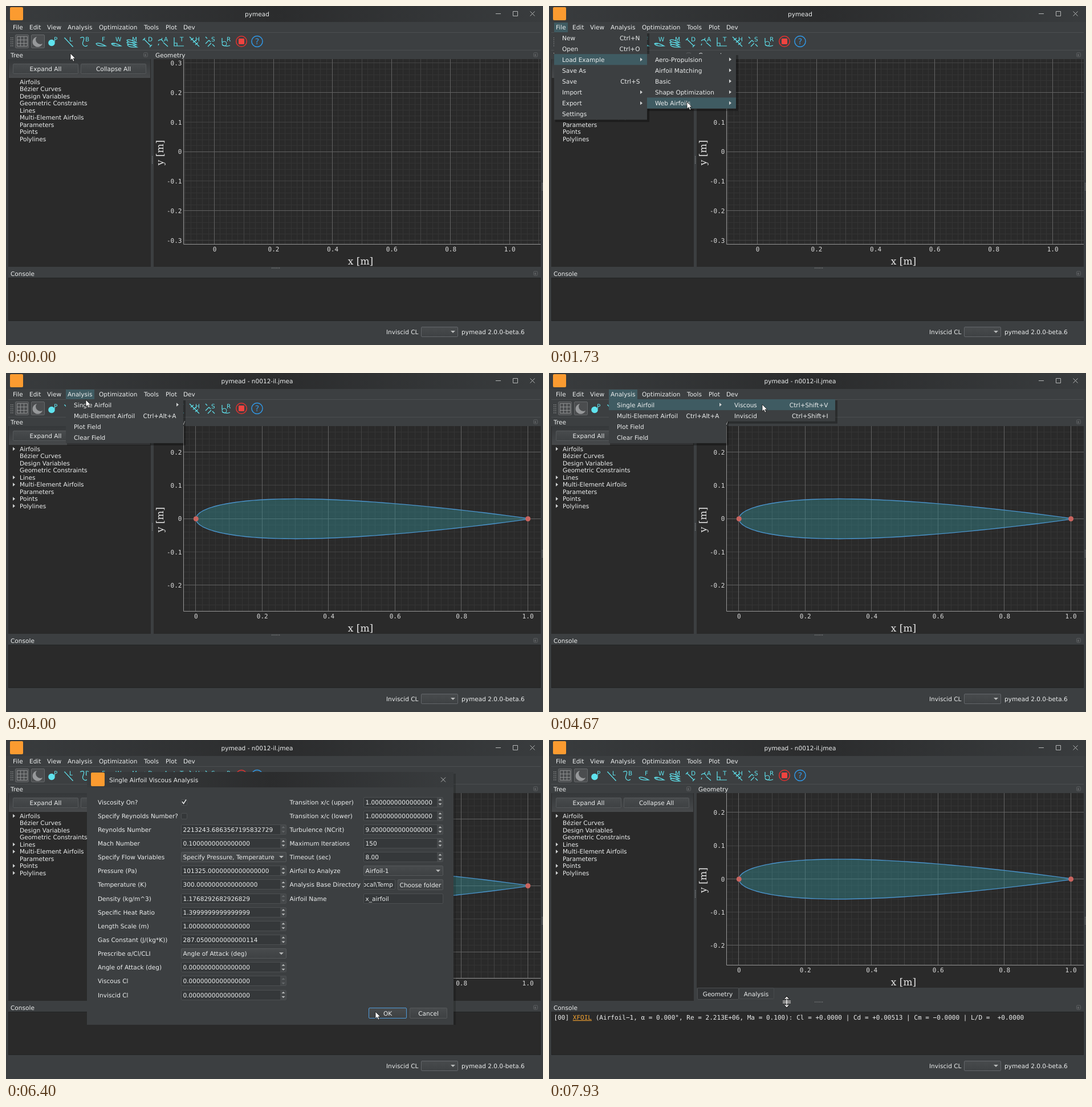
These frames come from a looping animation (942 px wide and 594 px high, 8 s). An HTML page:

```html
<!DOCTYPE html>
<html lang="en">
<head>
<meta charset="utf-8">
<title>pymead</title>
<style>
  html, body { margin: 0; width: 100%; height: 100%; overflow: hidden; background: #3c3f41; }
  svg { display: block; width: 942px; height: 594px; }
  text { font: 10.55px "DejaVu Sans", sans-serif; fill: #eceeee; white-space: pre; text-rendering: geometricPrecision; }
  .mono { font: 11.05px "DejaVu Sans Mono", monospace; }
  .tick { font: 11.05px "DejaVu Sans Mono", monospace; fill: #dcdcdc; }
  .axis { font: 17px "DejaVu Serif", serif; fill: #e8e8e8; }
  .icon text { font-size: 10.5px; fill: #5fe3ee; }
  .icon path { fill: none; stroke: #5fe3ee; stroke-width: 1.2; }
</style>
</head>
<body>
<svg viewBox="0 0 942 594" xmlns="http://www.w3.org/2000/svg"></svg>
<script>
const BG = '#3c3f41', BASE = '#2a2a2a', EDGE = '#55585a', HOVER = '#3f5b62', CYAN = '#5fe3ee', LOGO = '#fb9b30';
const LOOP = 8000, STEP = 1000 / 15, ROW = 19.1;

const rect = (x, y, w, h, fill, extra = '') =>
  `<rect x="${x}" y="${y}" width="${w}" height="${h}" fill="${fill}" ${extra}/>`;
const box = (x, y, w, h, fill, stroke = EDGE) =>
  rect(x + .5, y + .5, w - 1, h - 1, fill, `stroke="${stroke}" rx="1.5"`);
const text = (x, y, s, extra = '') => `<text x="${x}" y="${y}" ${extra}>${s}</text>`;
const mid = (x, y, s, extra = '') => text(x, y, s, 'text-anchor="middle" ' + extra);
const end = (x, y, s, extra = '') => text(x, y, s, 'text-anchor="end" ' + extra);
const path = (d, stroke, w = 1, fill = 'none') =>
  `<path d="${d}" stroke="${stroke}" stroke-width="${w}" fill="${fill}"/>`;
const circle = (x, y, r, fill, extra = '') => `<circle cx="${x}" cy="${y}" r="${r}" fill="${fill}" ${extra}/>`;
const group = (id, body, extra = '') => `<g id="${id}" ${extra}>${body}</g>`;
const range = (n, f) => Array.from({ length: n }, (_, i) => f(i)).join('');
const down = (x, y, c = '#b8baba') => path(`M${x - 4} ${y - 2}h8l-4 4z`, 'none', 0, c);
const right = (x, y) => path(`M${x} ${y - 3.2}v6.4l4 -3.2z`, 'none', 0, '#d0d2d2');
const cross = (x, y) => path(`M${x - 4} ${y - 4}l8 8m0 -8l-8 8`, '#b4b6b6');
const button = (x, y, w, h, s, stroke) =>
  box(x, y, w, h, 'url(#raised)', stroke) + mid(x + w / 2, y + h / 2 + 4, s);

function defs() {
  return `<defs>
    <linearGradient id="bar"><stop stop-color="#393c3e"/><stop offset=".5" stop-color="#2b2c2d"/><stop offset="1" stop-color="#393c3e"/></linearGradient>
    <linearGradient id="raised" x2="0" y2="1"><stop stop-color="#484b4d"/><stop offset="1" stop-color="#3e4143"/></linearGradient>
    <linearGradient id="strip" x2="0" y2="1"><stop stop-color="#35383a"/><stop offset="1" stop-color="#47494b"/></linearGradient>
    <clipPath id="dir"><rect x="628" y="245" width="54" height="18"/></clipPath>
  </defs>`;
}

function toolbar() {
  const foil = (x, y) => `M${x} ${y}q4 -3 17 4q-15 1 -17 -4z`;
  const letters = [['P', 84], ['L', 111], ['B', 139], ['F', 168], ['W', 192], ['M', 221], ['D', 249],
    ['A', 277], ['T', 305], ['H', 332], ['S', 360], ['R', 387]];
  const shapes = [
    'M103 56l14 15M102 56h2M116 71h2', 'M130 56c9 -4 7 2 5 7s3 10 8 6',
    foil(158, 66), foil(185, 66) + 'M185 66l6 1', foil(212, 60) + foil(212, 64) + foil(213, 68),
    'M242 58l12 12M240 60l4 -4M252 72l4 -4', 'M267 61q6 -5 9 2M276 64l8 7M268 66l-1 3M272 60l2 -4',
    'M295 55v15h17M295 65h5v5', 'M322 54l17 17M324 60l5 -4M328 64l5 -4M332 68l5 -4',
    'M350 54l3 3M356 60l3 3M362 67l4 4M350 66l6 -6M354 71l6 -6', 'M379 56v8M379 68q8 4 14 1'];
  return range(5, i => rect(8, 55 + i * 3.5, 1.5, 1.5, '#8a8c8d') + rect(11, 55 + i * 3.5, 1.5, 1.5, '#8a8c8d'))
    + box(16, 50, 24, 24, '#4b4d4f', '#65686a') + box(44, 50, 24, 24, '#4b4d4f', '#65686a')
    + path('M19.5 53.5h18v17h-18zM19.5 59.5h18M19.5 65.5h18M25.5 53.5v17M31.5 53.5v17', '#8c8e8f')
    + path('M54 54a9 9 0 1 0 10 12a8 8 0 0 1 -10 -12z', 'none', 0, '#96989a')
    + `<g class="icon">${shapes.map(d => `<path d="${d}"/>`).join('')}
       ${letters.map(([s, x]) => text(x, 61.5, s)).join('')}
       <circle cx="383" cy="66" r="4" fill="none" stroke="${CYAN}"/></g>`
    + circle(80, 64.5, 5.8, CYAN)
    + circle(413, 62, 9.3, 'none', 'stroke="#e23230" stroke-width="1.5"') + rect(408, 57, 10, 10, '#f04440', 'rx="1"')
    + circle(440.5, 62, 9.6, 'none', 'stroke="#3198e6" stroke-width="1.5"')
    + mid(440.5, 67, '?', 'style="font-size:14px;fill:#3198e6"');
}

function shell() {
  const bar = [['File', 12], ['Edit', 41], ['View', 72], ['Analysis', 108], ['Optimization', 163],
    ['Tools', 242], ['Plot', 280], ['Dev', 311]];
  const dock = (x, y, s, r) => text(x, y + 4, s) + box(r, y - 4, 8, 8, 'none', '#5c5f61') + rect(r + 2, y - 1, 3, 3, '#5c5f61');
  const dots = (x, y, dx, dy) => range(6, i => rect(x + i * dx, y + i * dy, 1.2, 1.2, '#8c8e8f'));
  return rect(0, 0, 942, 594, BG) + rect(0, 0, 942, 28, 'url(#bar)')
    + rect(7, 2, 23, 23, LOGO, 'rx="2"')
    + mid(440.5, 17.5, '', 'id="title"')
    + path('M859 13.5h9M889.5 9.5h8v8h-8z', '#b4b6b6') + cross(923.5, 13.5)
    + group('fileHot', rect(9, 29, 24, 17, HOVER)) + group('anaHot', rect(105, 29, 50, 17, HOVER))
    + bar.map(([s, x]) => text(x, 41, s)).join('')
    + rect(4, 46, 934, 1, '#4b4e50') + rect(4, 77, 934, 1, '#4b4e50') + toolbar()
    + dock(8, 85.5, 'Tree', 241) + dock(262, 85.5, 'Geometry', 925) + dock(8, 468.5, 'Console', 925)
    + rect(4, 93, 250, 364, BASE) + rect(5, 93, 248, 33, 'url(#strip)')
    + button(12, 101, 115, 18, 'Expand All') + button(131, 101, 115, 18, 'Collapse All')
    + ['Airfoils', 'Bézier Curves', 'Design Variables', 'Geometric Constraints', 'Lines',
      'Multi-Element Airfoils', 'Parameters', 'Points', 'Polylines']
      .map((s, i) => text(24, 136.8 + i * 12.5, s)).join('')
    + group('arrows', [0, 4, 5, 7, 8].map(i => right(12, 133 + i * 12.5)).join(''))
    + dots(256, 263, 0, 2.4) + dots(940, 310, 0, 2.4) + dots(466, 458.5, 2.6, 0)
    + rect(4, 476, 934, 76, '#232425') + rect(5, 477, 932, 74, BASE)
    + text(667, 575, 'Inviscid CL') + box(728, 562, 65, 18, 'url(#raised)', '#63666a') + down(784, 571)
    + text(799, 575, 'pymead 2.0.0-beta.6');
}

// scale in px per unit, screen place of the origin, and bottom edge of the plot
function plot(s, x0, y0, bottom, foil) {
  const L = 312, T = 93, R = 938;
  const levels = [[.02, '#343434'], [.1, '#434343'], [.2, '#626262']];
  let out = rect(259, T, 679, bottom + 39 - T, BASE);
  for (const [gap, color] of levels) {
    const px = gap * s;
    let d = '';
    for (let i = Math.ceil((L - x0) / px); x0 + i * px < R; i++) d += `M${Math.round(x0 + i * px) - .5} ${T}V${bottom}`;
    for (let i = Math.ceil((T - y0) / px); y0 + i * px < bottom; i++) d += `M${L} ${Math.round(y0 + i * px) - .5}H${R}`;
    out += path(d, color);
  }
  out += path(`M311.5 ${T}V${bottom - .5}H${R}`, '#969696');
  out += range(6, i => mid(x0 + i * .2 * s, bottom + 11.5, i ? (i / 5).toFixed(1) : '0', 'class="tick"'));
  for (let i = -3; i <= 3; i++) {
    const y = y0 - i * .1 * s;
    if (y > T + 5 && y < bottom - 5) out += end(308.5, y + 3.8, i ? (i / 10).toFixed(1) : '0', 'class="tick"');
  }
  out += mid(622, bottom + 34.5, 'x [m]', 'class="axis"')
    + mid(0, 0, 'y [m]', `class="axis" transform="translate(276 ${(T + bottom) / 2 + 1.5}) rotate(-90)"`);
  if (foil) {
    const half = x => .6 * (.2969 * Math.sqrt(x) - .126 * x - .3516 * x ** 2 + .2843 * x ** 3 - .1015 * x ** 4);
    const side = (sign, i) => { const x = (i / 60) ** 2; return `${x0 + x * s} ${y0 - sign * half(x) * s} `; };
    out += path('M' + range(61, i => side(1, 60 - i)) + range(61, i => side(-1, i)) + 'z', '#4a94cc', 1.4, 'rgba(52,135,143,.45)')
      + [0, 1].map(x => circle(x0 + x * s, y0, 4.5, '#c9645f')).join('');
  }
  return out;
}

function results() {
  return plot(582.3, 333.3, 243.8, 395, true) + rect(259, 434, 679, 23, BG)
    + box(260, 434, 73, 21, '#303234', '#4c4f51') + box(333, 434, 62, 20, '#3a3d3f', '#484b4d')
    + mid(296, 449, 'Geometry') + mid(363.5, 448.5, 'Analysis');
}

function consoleLine() {
  return text(8.5, 490, '[00] <tspan fill="#f0a030" text-decoration="underline">XFOIL</tspan> (Airfoil−1, α = 0.000°, Re = 2.213E+06, Ma = 0.100): '
    + 'Cl = +0.0000 | Cd = +0.00513 | Cm = −0.0000 | L/D =  +0.0000', 'class="mono"');
}

function dialog() {
  const zero = '0.' + '0'.repeat(16), one = '1.' + '0'.repeat(16);
  const rowY = i => 108.5 + 24.15 * i;
  const field = (x, y, w, s) => box(x, Math.round(y) - 9, w, 18, '#35383a', '#4c4f51') + text(x + 3.5, y + 4, s);
  const spin = (x, y, w, s, off) => {
    const c = off ? '#66696b' : '#bcbebe', bx = x + w - 5.5;
    return field(x, y, w, s) + rect(x + w - 11, Math.round(y) - 8, 10, 16, '#45484a')
      + path(`M${bx - 3} ${y - 2.5}h6l-3 -3zM${bx - 3} ${y + 2.5}h6l-3 3z`, 'none', 0, c);
  };
  const combo = (x, y, w, s) => box(x, Math.round(y) - 9, w, 18, 'url(#raised)') + text(x + 3.5, y + 4, s) + down(x + w - 9, y);
  const check = y => box(307, Math.round(y) - 5, 11, 11, '#35383a', '#4c4f51');
  const left = [
    ['Viscosity On?'], ['Specify Reynolds Number?'],
    ['Reynolds Number', '2213243.6863567195832729', 'off'], ['Mach Number', '0.1' + '0'.repeat(15)],
    ['Specify Flow Variables', 'Specify Pressure, Temperature', 'list'],
    ['Pressure (Pa)', '101325' + zero.slice(1)], ['Temperature (K)', '300' + zero.slice(1)],
    ['Density (kg/m^3)', '1.1768292682926829', 'off'], ['Specific Heat Ratio', '1.3999999999999999'],
    ['Length Scale (m)', one], ['Gas Constant (J/(kg*K))', '287.0500000000000114'],
    ['Prescribe α/Cl/CLI', 'Angle of Attack (deg)', 'list'], ['Angle of Attack (deg)', zero],
    ['Viscous Cl', zero, 'off'], ['Inviscid Cl', zero]];
  const rightSide = [
    ['Transition x/c (upper)', one], ['Transition x/c (lower)', one], ['Turbulence (NCrit)', '9' + zero.slice(1)],
    ['Maximum Iterations', '150'], ['Timeout (sec)', '8.00'], ['Airfoil to Analyze', 'Airfoil-1', 'list'],
    ['Analysis Base Directory'], ['Airfoil Name']];
  const column = (rows, lx, fx, w) => rows.map(([label, value, kind], i) =>
    text(lx, rowY(i) + 4, label) + (!value ? '' : kind === 'list' ? combo(fx, rowY(i), w, value)
      : spin(fx, rowY(i), w, value, kind))).join('');
  return rect(144, 59, 645, 440, 'rgba(0,0,0,.18)') + rect(142, 56, 643, 443, BG) + rect(142, 56, 643, 27, 'url(#bar)')
    + rect(149, 57, 24, 24, LOGO, 'rx="2"') + text(181, 73.5, 'Single Airfoil Viscous Analysis') + cross(767, 69.5)
    + column(left, 161, 307, 185) + column(rightSide, 497.5, 627, 140)
    + check(rowY(0)) + path('M309 108l2.5 3.5l4.5 -7', '#eceeee', 1.5) + check(rowY(1))
    + box(627, 244, 56, 18, '#35383a', '#4c4f51') + end(679, rowY(6) + 4, 'Local\\Temp', 'clip-path="url(#dir)"')
    + button(687, 244, 80, 19, 'Choose folder') + field(627, rowY(7), 140, 'x_airfoil')
    + button(636, 469, 67, 19, 'OK', '#4f9ad8') + button(708, 469, 66, 19, 'Cancel');
}

// from, till: when shown; child: row kept lit once its submenu opens
const menus = [
  { id: 'file', x: 9, y: 46, w: 163, from: 530, till: 2730, child: [1270, 2], items: [['New', 'Ctrl+N'], ['Open', 'Ctrl+O'],
    ['Load Example', '>'], ['Save As'], ['Save', 'Ctrl+S'], ['Import', '>'], ['Export', '>'], ['Settings']] },
  { id: 'examples', x: 172, y: 84, w: 156, from: 1270, till: 2730, child: [1930, 4], items: [['Aero-Propulsion', '>'],
    ['Airfoil Matching', '>'], ['Basic', '>'], ['Shape Optimization', '>'], ['Web Airfoils', '>']] },
  { id: 'web', x: 328, y: 161, w: 120, from: 1930, till: 2730, items: [['n0012-il']] },
  { id: 'analysis', x: 105, y: 46, w: 206, from: 3800, till: 4870, child: [4270, 0], items: [['Single Airfoil', '>'],
    ['Multi-Element Airfoil', 'Ctrl+Alt+A'], ['Plot Field'], ['Clear Field']] },
  { id: 'single', x: 311, y: 46, w: 191, from: 4270, till: 4870, items: [['Viscous', 'Ctrl+Shift+V'], ['Inviscid', 'Ctrl+Shift+I']] }];

function menu({ id, x, y, w, items }) {
  const h = items.length * ROW + .5;
  return group(id, rect(x + 2, y + 2, w + 2, h + 2, 'rgba(0,0,0,.3)') + rect(x, y, w, h, BG)
    + rect(x, y, w, ROW, HOVER, `id="${id}Lit"`)
    + items.map(([label, key], i) => {
      const c = y + (i + .5) * ROW;
      return text(x + 14, c + 4, label) + (key === '>' ? right(x + w - 12, c) : key ? end(x + w - 12.5, c + 4, key) : '');
    }).join(''));
}

document.querySelector('svg').innerHTML = defs() + shell()
  + group('empty', plot(517.7, 366, 255.5, 418, false))
  + group('loaded', plot(582.3, 333.3, 255.5, 418, true))
  + group('auto', box(260, 446, 11, 10, '#1c1c1c', '#b0b0b0') + mid(265.5, 454.5, 'A', 'style="font-size:9.5px"'))
  + group('done', results()) + group('log', consoleLine())
  + menus.map(menu).join('') + group('dialog', dialog())
  + group('arrow', path('M0 0V12.2L2.9 9.6L5 14.2L7 13.3L5 8.9H8.8Z', '#111', .8, '#fff'))
  + group('resize', path('M-7 -1.5H7M-7 1.5H7M0 -8V8M-3 -5L0 -8.5L3 -5M-3 5L0 8.5L3 5', '#111', 3.2)
    + path('M-7 -1.5H7M-7 1.5H7M0 -8V8M-3 -5L0 -8.5L3 -5M-3 5L0 8.5L3 5', '#fff', 1.3));

const el = id => document.getElementById(id);
const show = (id, on) => { el(id).style.display = on ? '' : 'none'; };

// pointer moves: start, end, x, y
const moves = [
  [0, 330, 20, 39], [530, 1000, 70, 95], [1200, 1530, 190, 97], [1530, 1730, 242, 168], [1870, 2470, 408, 178],
  [2670, 3000, 422, 185], [3200, 3800, 130, 40], [3870, 4000, 140, 47], [4000, 4070, 144, 51], [4070, 4130, 147, 53],
  [4200, 4670, 374, 55], [4800, 5000, 374, 74], [5000, 6400, 648, 476], [6530, 6800, 632, 477],
  [6930, 7130, 618, 460], [7130, 7270, 632, 460], [7400, 7530, 637, 464], [7730, 7930, 417, 459]];

function pointer(t) {
  let x = 113, y = 83;
  for (const [a, b, nx, ny] of moves) {
    if (t <= a) break;
    const p = Math.min(1, (t - a) / (b - a)), e = p * p * (3 - 2 * p);
    x += (nx - x) * e;
    y += (ny - y) * e;
  }
  return [x, y];
}

function draw(time) {
  const t = Math.floor((time + 5) / STEP) * STEP + 4;
  const [x, y] = pointer(t);
  const between = (a, b) => t >= a && t < b;
  const loaded = t >= 2870, done = t >= 6730;
  const onBar = y > 29 && y < 46;
  el('title').textContent = t >= 2800 ? 'pymead - n0012-il.jmea' : 'pymead';
  show('fileHot', between(530, 2730) || onBar && x > 9 && x < 33);
  show('anaHot', between(3800, 4870) || onBar && x > 105 && x < 155);
  show('arrows', loaded);
  show('empty', !loaded);
  show('loaded', loaded && !done);
  show('auto', loaded && t < 4000 && x > 259 && y > 93);
  show('done', done);
  show('log', done);
  show('dialog', between(4930, 6470));
  for (const m of menus) {
    show(m.id, between(m.from, m.till));
    const inside = x >= m.x && x < m.x + m.w && y > m.y + 2 && y < m.y + m.items.length * ROW;
    const kept = m.child && t >= m.child[0];
    const row = kept ? m.child[1] : Math.floor((y - m.y) / ROW);
    show(m.id + 'Lit', kept || inside);
    el(m.id + 'Lit').setAttribute('y', m.y + row * ROW);
  }
  const sizing = t > 6900 && Math.abs(y - 460) < 3;
  show('arrow', !sizing);
  show('resize', sizing);
  el(sizing ? 'resize' : 'arrow').setAttribute('transform', `translate(${Math.round(x)} ${Math.round(y)})`);
}

const start = performance.now();
function tick() {
  draw((performance.now() - start) % LOOP);
  requestAnimationFrame(tick);
}
tick();
</script>
</body>
</html>
```
